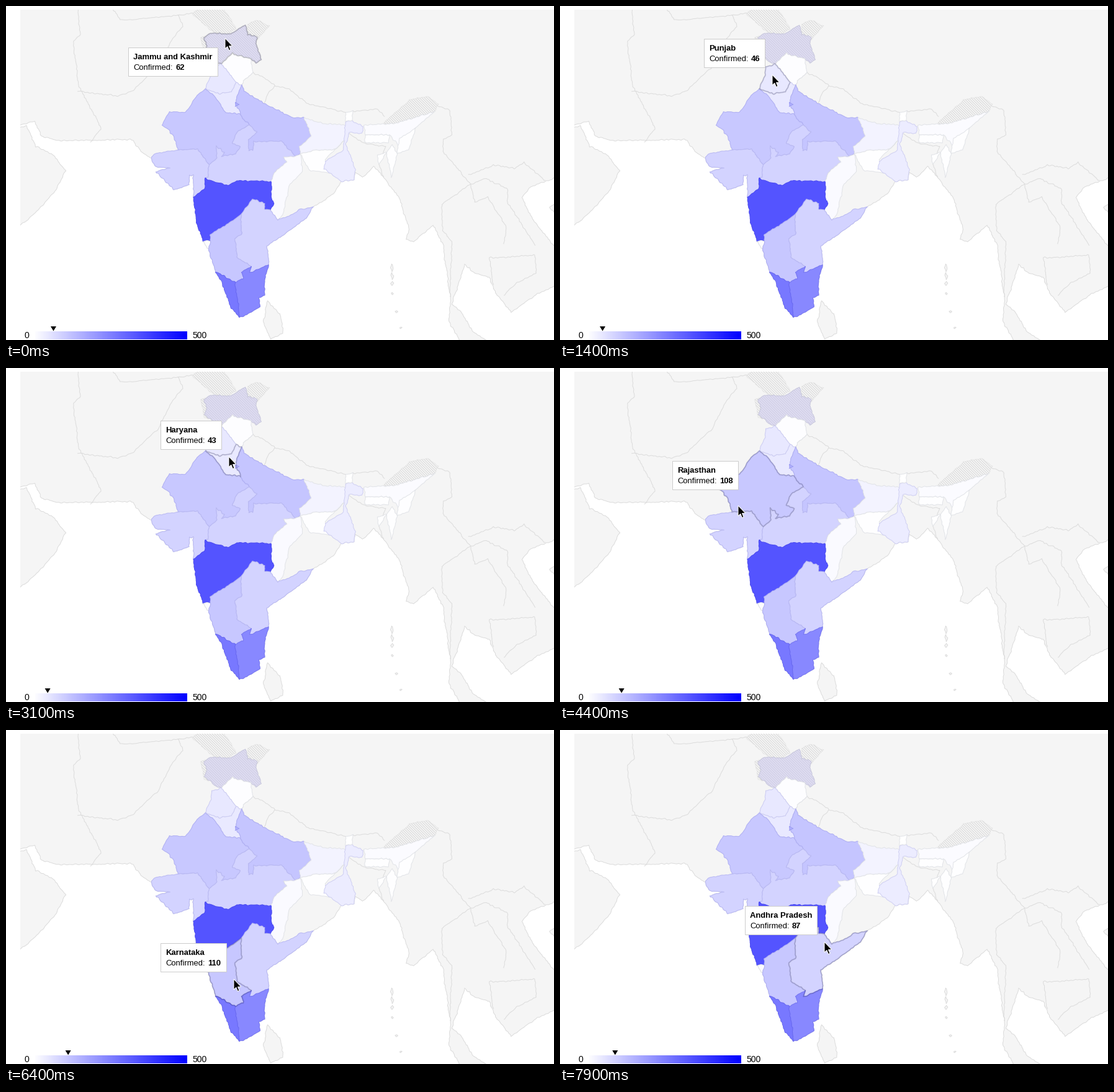
A matplotlib script that plays this animation: 883 by 539 pixels, repeating every 8000 ms.

```python
import numpy as np
import matplotlib.pyplot as plt
from matplotlib.animation import FuncAnimation
from matplotlib.patches import PathPatch, Polygon, Rectangle
from matplotlib.path import Path

W, H, DPI = 883, 539, 64
PX = 72 / DPI  # points per pixel
plt.rcParams["font.family"] = "Liberation Sans"

fig = plt.figure(figsize=(W / DPI, H / DPI), dpi=DPI, facecolor="white")
ax = fig.add_axes([0, 0, 1, 1])
ax.axis("off")

LAND, LINE = "#f5f5f5", "#dcdcdc"
rng = np.random.default_rng(7)

# Waves of several lengths; their sum shakes every outline by place alone,
# so neighbours that share an arc stay joined.
WAVES = [(length, *rng.uniform(0, 2 * np.pi, 3))
         for length in (6, 7, 9, 12, 16, 24) for _ in range(2)]


def shake(p):
    x, y = p.T
    out = np.zeros_like(p)
    for length, turn, phase, side in WAVES:
        k = 2 * np.pi / length
        wave = np.sin(k * (x * np.cos(turn) + y * np.sin(turn)) + phase)
        out += 0.3 * wave[:, None] * (np.cos(side), np.sin(side))
    return p + out + 0.5


def rough(points, closed=True):
    p = np.array(points + points[:1] if closed else points, float)
    out = [p[:1]]
    for a, b in zip(p[:-1], p[1:]):
        n = max(1, int(np.hypot(*(b - a)) / 2))
        out.append(a + (b - a) * np.linspace(0, 1, n + 1)[1:, None])
    return Path(shake(np.vstack(out)))


def pts(*v):
    return list(zip(v[::2], v[1::2]))


def draw(path, fill="none", edge=LINE, width=1.0, **kw):
    patch = PathPatch(path, facecolor=fill, edgecolor=edge, lw=width * PX,
                      joinstyle="round", **kw)
    return ax.add_patch(patch)


def land(points):
    return draw(rough(points), LAND)


def border(*v):
    draw(rough(pts(*v), False))


def hatch(patch, color):
    x0, y0, x1, y1 = patch.get_path().get_extents().extents
    verts, h = [], y1 - y0
    for x in np.arange(np.floor((x0 - h) / 4) * 4, x1, 4):
        verts += [(x, y0), (x + h, y1)]
    lines = Path(verts, [Path.MOVETO, Path.LINETO] * (len(verts) // 2))
    draw(lines, edge=color, width=0.8).set_clip_path(patch)


def shade(v):
    c = 1 - v / 500
    return (c, c, 1)


# Coasts, west to east
iran = pts(10, 194, 46, 186, 57, 210, 86, 217, 203, 215, 217, 234, 234, 246)
gujarat = pts(234, 246, 240, 259, 264, 261, 241, 267, 270, 296, 294, 288, 295, 273,
              301, 272, 302, 308)
maha = pts(302, 308, 306, 345, 317, 379)
goa = pts(317, 379, 326, 393)
karn = pts(326, 393, 337, 428)
kerala = pts(337, 428, 348, 448, 363, 487, 376, 502)
tamil = pts(376, 502, 388, 498, 409, 485, 407, 471, 416, 466, 416, 440, 423, 417)
andhra = pts(423, 417, 420, 386, 446, 370, 483, 341, 495, 324)
bengal = pts(495, 324, 527, 302, 540, 283, 560, 280, 562, 268, 575, 276, 592, 258, 608, 276)
burma = pts(608, 276, 634, 310, 649, 360, 645, 376, 656, 380, 688, 353, 703, 384, 716, 470,
            713, 508, 734, 545)
siam = pts(782, 545, 752, 525, 735, 496, 718, 480, 739, 417, 755, 431, 778, 437, 789, 463,
           814, 494, 852, 466, 890, 448)
viet = pts(890, 396, 846, 341, 831, 308, 845, 291, 890, 275)

land(iran + gujarat + maha + goa + karn + kerala + tamil + andhra + bengal + burma + siam
     + viet + pts(890, -5, 10, -5))
land(pts(10, 198, 33, 193, 48, 226, 76, 240, 96, 266, 77, 300, 62, 318, 31, 348, 10, 358))
land(pts(890, 314, 875, 325, 890, 338))
land(pts(420, 475, 441, 497, 446, 528, 426, 537, 414, 510))
for y in (415, 430, 444, 462, 491, 517):
    x, h = 622 + max(0, y - 465) / 4, max(3, (470 - y) / 4)
    land(pts(x, y, x + 2, y + h / 2, x, y + h, x - 2, y + h / 2))

# Borders between countries
border(114, -2, 119, 45, 108, 56, 117, 130, 147, 185, 152, 198, 136, 219)
border(115, 137, 180, 145, 204, 136, 245, 97, 268, 52, 285, 32, 277, 14)
border(168, -2, 183, 21, 203, 22, 277, 14, 300, 11)
border(433, 128, 455, 133, 485, 157, 547, 171)
border(556, 170, 598, 166, 610, 178)
border(694, 160, 715, 168, 718, 208, 704, 214, 703, 234, 722, 256, 748, 287)
border(748, 287, 701, 319, 703, 362, 718, 380, 715, 470)
border(744, 272, 786, 256, 820, 262, 834, 252, 868, 281)
border(748, 287, 754, 316, 776, 308, 806, 356, 801, 384)
border(748, 287, 773, 278, 808, 295, 808, 317, 852, 386)
border(785, 450, 778, 406, 852, 402, 854, 430, 822, 447, 801, 467)
border(553, 206, 576, 221, 611, 226, 600, 254, 608, 276)

# Arcs shared by neighbouring states
guj_raj = pts(277, 232, 308, 230, 327, 256)
guj_mp = pts(327, 256, 325, 276, 320, 277)
guj_maha = pts(320, 277, 320, 294, 302, 308)
raj_mp = pts(327, 256, 339, 245, 338, 226, 352, 236, 346, 242, 370, 238, 377, 226, 363, 221,
             372, 203, 392, 191)
har_raj = pts(320, 133, 335, 144, 354, 172, 378, 174)
raj_up = pts(378, 174, 382, 183, 392, 191)
har_up = pts(380, 127, 373, 143, 370, 158, 378, 174)
mp_up = pts(392, 191, 404, 204, 390, 215, 390, 232, 398, 232, 399, 218, 444, 218, 466, 242)
mp_maha = pts(320, 277, 333, 283, 358, 289, 372, 281, 427, 283)
chh_mp = pts(427, 283, 432, 268, 452, 251, 448, 244, 466, 242)
chh_maha = pts(427, 283, 427, 308, 432, 318, 426, 329)
maha_andhra = pts(379, 335, 396, 311, 417, 318, 416, 328, 426, 329)
maha_karn = pts(317, 379, 329, 378, 328, 369, 358, 350, 379, 335)
karn_andhra = pts(379, 335, 379, 368, 368, 375, 372, 405, 395, 420)
andhra_tamil = pts(395, 420, 391, 430, 423, 417)
karn_tamil = pts(395, 420, 379, 429, 382, 440, 368, 445)
karn_kerala = pts(368, 445, 337, 428)
kerala_tamil = pts(368, 445, 376, 502)
punjab_har = pts(320, 133, 342, 141, 362, 138, 370, 123)
punjab_hp = pts(347, 93, 370, 123)
hp_uk = pts(380, 127, 382, 119, 398, 108)
jk_hp = pts(347, 93, 363, 76, 394, 85)
up_uk = pts(380, 127, 383, 137, 416, 157)
up_bihar = pts(480, 180, 491, 209, 473, 226, 474, 238)
bihar_east = pts(474, 238, 498, 232, 530, 231, 550, 211, 547, 191)

# name -> (confirmed, outline); later ones lie on top
STATES = {
    "Jammu and Kashmir": (62, jk_hp + pts(
        403, 91, 411, 85, 402, 60, 404, 49, 389, 45, 385, 30, 362, 45, 330, 43, 318, 50,
        324, 65, 319, 74, 336, 89)),
    "Himachal Pradesh": (3, jk_hp + hp_uk[::-1] + punjab_hp[::-1]),
    "Punjab": (46, punjab_hp + punjab_har[::-1] + pts(331, 110, 331, 97)),
    "Haryana": (43, punjab_har + har_up + har_raj[::-1]),
    "Rajasthan": (108, har_raj + raj_up + raj_mp[::-1] + guj_raj[::-1] + pts(
        272, 216, 261, 198, 251, 192, 262, 170, 289, 171, 308, 143)),
    "Gujarat": (87, pts(234, 243, 242, 237) + guj_raj + guj_mp + guj_maha + gujarat[::-1]),
    "Uttar Pradesh": (113, har_up[::-1] + up_uk + pts(462, 180) + up_bihar + mp_up[::-1]
                      + raj_up[::-1]),
    "Madhya Pradesh": (86, raj_mp + mp_up + chh_mp[::-1] + mp_maha[::-1] + guj_mp[::-1]),
    "Bihar": (24, up_bihar + bihar_east + pts(514, 190)),
    "Jharkhand": (1, bihar_east[:-1] + pts(514, 248, 526, 270, 487, 264)),
    "Chhattisgarh": (9, chh_maha[::-1] + chh_mp + pts(
        474, 239, 478, 267, 457, 287, 446, 336, 437, 345)),
    "West Bengal": (37, pts(
        547, 186, 556, 184, 575, 194, 574, 205, 553, 204, 547, 222, 562, 262, 560, 280,
        540, 283, 512, 262, 514, 250, 543, 232)),
    "Maharashtra": (335, mp_maha + chh_maha + maha_andhra[::-1] + maha_karn[::-1]
                    + maha[::-1] + guj_maha[::-1]),
    "Goa": (5, goa + pts(329, 378)),
    "Karnataka": (110, maha_karn[1:] + karn_andhra + karn_tamil + karn_kerala + karn[::-1]),
    "Andhra Pradesh": (87, maha_andhra + pts(437, 345, 462, 336, 472, 328) + andhra[::-1]
                       + andhra_tamil[::-1] + karn_andhra[::-1]),
    "Tamil Nadu": (234, andhra_tamil + tamil[::-1] + kerala_tamil[::-1] + karn_tamil[::-1]),
    "Kerala": (265, kerala_tamil + kerala[::-1] + karn_kerala[::-1]),
    "Delhi": (152, pts(369, 155, 375, 158, 369, 162)),
    "Assam": (8, pts(576, 192, 625, 189, 690, 170, 660, 196, 634, 228, 618, 208, 578, 207)),
    "Meghalaya": (1, pts(578, 207, 618, 208, 616, 220, 577, 220)),
    "Manipur": (2, pts(634, 213, 660, 196, 648, 232, 629, 237)),
    "Mizoram": (1, pts(613, 236, 622, 224, 630, 238, 621, 276)),
    "Tripura": (0, pts(598, 240, 613, 236, 600, 254)),
    "Sikkim": (0, pts(547, 171, 558, 169, 557, 184, 547, 185)),
}

land(pts(412, 113, 433, 128, 422, 140) + up_uk[::-1] + hp_uk)
for zone in (
    pts(299, 12, 312, 3, 350, 3, 371, 37, 352, 47, 332, 40),
    pts(313, 50, 320, 47, 326, 82, 318, 78),
    pts(388, 30, 404, 22, 424, 32, 402, 56, 389, 45),
    pts(608, 189, 650, 150, 679, 145, 696, 158, 690, 170, 625, 189),
):
    hatch(draw(rough(zone), LAND, "#e8e8e8"), "#d2d2d2")

outlines = {}
for name, (cases, outline) in STATES.items():
    fill = np.array(shade(cases))
    edge = "#e2e4e8" if cases < 25 else fill * (0.88, 0.88, 0.95)
    outlines[name] = rough(outline)
    if name == "Jammu and Kashmir":
        hatch(draw(outlines[name], "#dfddf2", "#c8c8dc"), "#cccae0")
    else:
        draw(outlines[name], tuple(fill), edge)

for w, h in [(23, H), (W, 6)]:
    ax.add_patch(Rectangle((0, 0), w, h, fc="white", ec="none"))

# Legend
ramp = np.array([[shade(v) for v in np.linspace(4, 500, 245)]])
ax.imshow(ramp, extent=(47, 292, 538, 525), aspect="auto", interpolation="nearest")
for x, text in [(30, "0"), (300, "500")]:
    ax.text(x, 536, text, fontsize=14 * PX, color="black")
ax.set_xlim(0, W)
ax.set_ylim(H, 0)

# Moving parts
glow = draw(outlines["Punjab"], edge=(0, 0, 0, 0.14), width=2, zorder=4)
marker = ax.add_patch(Polygon([(0, 0)] * 3, fc="black", ec="none", zorder=4))
box = ax.add_patch(Rectangle((0, 0), 1, 46, fc="white", ec="#cccccc", lw=PX, zorder=5,
                             snap=False))
title, label, count = (
    ax.text(0, 0, s, fontsize=13 * PX, weight=w, color="black", zorder=6)
    for s, w in [("", "bold"), ("Confirmed:", "normal"), ("", "bold")])
ARROW = np.array(pts(0, 0, 0, 17, 3.8, 13.4, 6.4, 19.6, 9, 18.5, 6.5, 12.5, 11.8, 12.3))
cursor = ax.add_patch(Polygon(ARROW, fc="black", ec="white", lw=PX, zorder=7))
tip_parts = (glow, marker, box, title, label, count)

# Pointer stops: arrive, leave, x, y
STOPS = [(0, 0, 353, 52), (2, 5, 338, 29), (8, 8, 352, 68), (12, 14, 342, 111),
         (16, 16, 368, 101), (20, 20, 424, 125), (22, 27, 384, 125), (28, 28, 380, 137),
         (30, 32, 359, 143), (34, 36, 351, 150), (38, 40, 335, 168), (44, 45, 287, 222),
         (48, 49, 300, 268), (53, 55, 328, 310), (63, 65, 367, 402), (71, 71, 398, 366),
         (74, 74, 410, 408), (78, 79, 426, 342)]
times = [t for stop in STOPS for t in stop[:2]]
places = np.repeat([stop[2:] for stop in STOPS], 2, axis=0)


def mouse(i):
    return np.array([np.interp(i, times, places[:, k]) for k in (0, 1)])


def hovered(p):
    hits = [n for n, path in outlines.items() if path.contains_point(p)]
    return hits[-1] if hits else None


def update(i):
    tip = mouse(i)
    cursor.set_xy(tip + ARROW)
    name = hovered(tip)
    for part in tip_parts:
        part.set_visible(name is not None)
    if name is None:
        return ()
    cases = STATES[name][0]
    glow.set_path(outlines[name])
    mx = 45.9 + 0.493 * cases
    marker.set_xy([(mx - 4.5, 517), (mx + 4.5, 517), (mx, 524.5)])

    title.set_text(name)
    count.set_text(str(cases))
    text_w = title.get_window_extent(fig.canvas.get_renderer()).width
    width = round(max(text_w, 68 + 7.23 * len(str(cases))) + 16)
    # the tooltip trails the pointer by one step and flips below it near the top
    x, y = np.round(mouse(max(i - 1, 0)))
    left = x - 12 - width
    top = y - 58 if y >= 60 else y + 15
    box.set_xy((left + 0.5, top + 0.5))
    box.set_width(width)
    title.set_position((left + 8, top + 19))
    label.set_position((left + 8, top + 36))
    count.set_position((left + 76, top + 36))
    return ()


anim = FuncAnimation(fig, update, frames=80, interval=100, repeat=True,
                     repeat_delay=0, init_func=lambda: update(0), blit=False)
plt.show()
```
